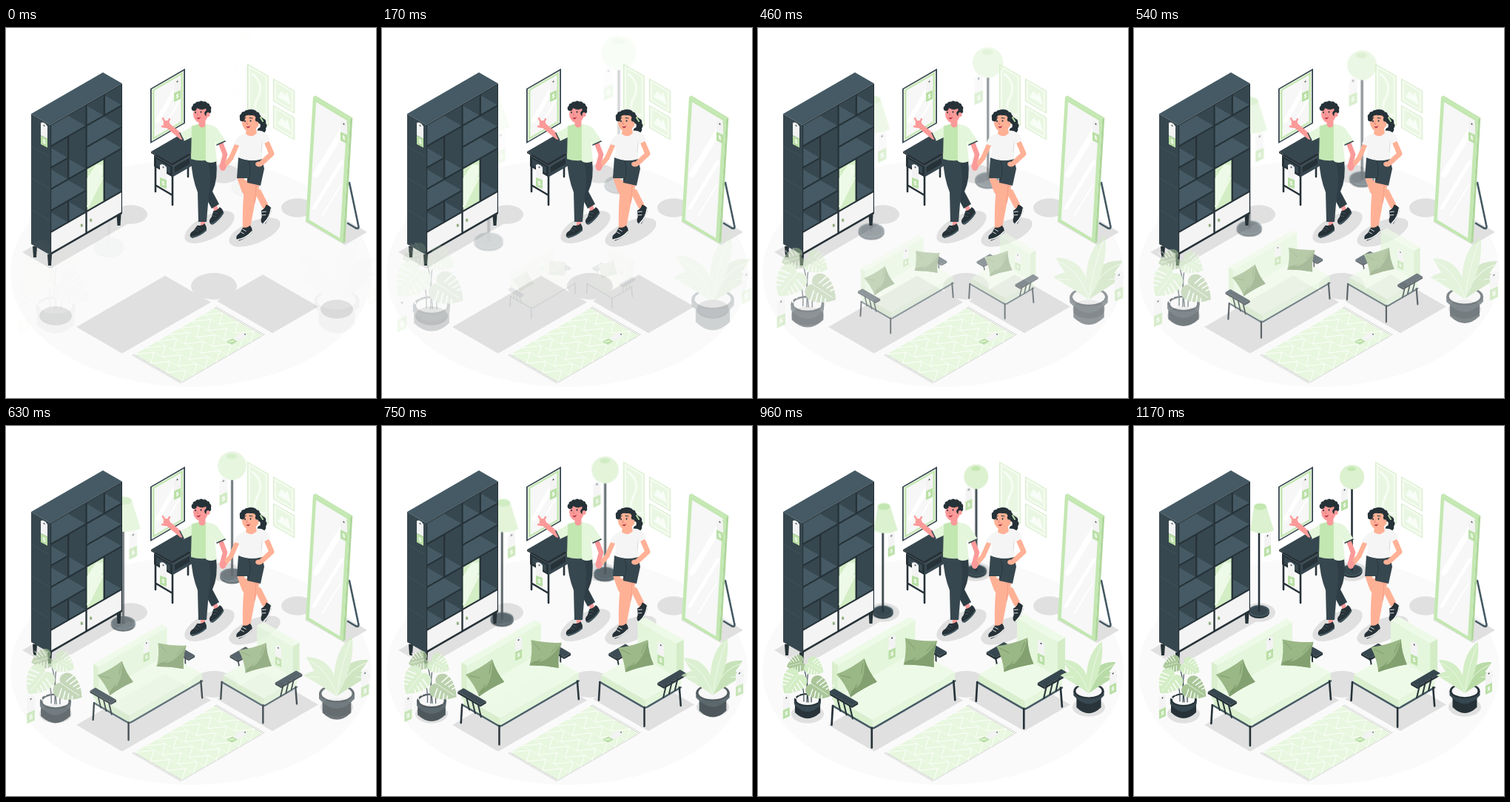
An HTML page that plays this animation: 500 px wide and 500 px high, repeating every 1210 ms.

```html
<!DOCTYPE html>
<html lang="en">
<head>
<meta charset="utf-8">
<title>Furniture showroom</title>
<style>
html, body { margin: 0; height: 100%; overflow: hidden; background: #fff }
svg { display: block; width: 100%; height: 100% }
text { font: 700 7px Inter, sans-serif; fill: #fff; text-anchor: middle }
</style>
</head>
<body>
<svg id="stage" viewBox="0 0 500 500"></svg>
<script>
const INK = '#263238', DARK = '#37474f', SLATE = '#455a64', SHADOW = '#e0e0e0';
const GREEN = '#c3e7b1', PALE = '#e4f6db', MINT = '#eefae8', LEAF = '#d3edc5', SAGE = '#a9c698';
const PINK = '#fb9a99', PEACH = '#ffb196', CLOTH = '#f5f5f5';
const ISO = Math.tan(Math.PI / 6);

const path = (d, fill) => `<path d="${d}" fill="${fill}"/>`;
const line = (d, color, width = 1) => `<path d="${d}" fill="none" stroke="${color}" stroke-width="${width}" ` +
  'stroke-linecap="round" stroke-linejoin="round"/>';
const oval = (x, y, rx, ry, fill, turn = 0) =>
  `<ellipse cx="${x}" cy="${y}" rx="${rx}" ry="${ry}" fill="${fill}" transform="rotate(${turn} ${x} ${y})"/>`;
const group = (transform, ...parts) => `<g transform="${transform}">${parts.join('')}</g>`;
const layer = (id, ...parts) => `<g id="${id}">${parts.join('')}</g>`;
const repeat = (n, make) => Array.from({ length: n }, (_, i) => make(i)).join('');

// Isometric shapes: dir 1 slopes down to the right, -1 slopes up
const wall = (x, y, w, h, dir, fill) => path(`M${x} ${y}l${w} ${dir * ISO * w}v${h}l${-w} ${-dir * ISO * w}Z`, fill);
const panel = (x, y, w, h, dir, inset, fill) =>
  wall(x + inset, y + inset * (1 + dir * ISO), w - 2 * inset, h - 2 * inset, dir, fill);
const ground = (x, y, p, q, fill) =>
  path(`M${x} ${y}l${p} ${p * ISO}l${q} ${-q * ISO}l${-p} ${-p * ISO}Z`, fill);
const box = (x, y, p, q, h, [top, left, right]) => ground(x, y, p, q, top) +
  wall(x, y, p, h, 1, left) + wall(x + p, y + p * ISO, q, h, -1, right);

const tag = (x, y, turn = -25, h = 30) => group(`translate(${x} ${y}) skewY(${turn})`,
  path(`M0 2L3 0H6L9 2V${h - 12}H0Z`, '#f3f3f3'), path(`M0 ${h - 12}H9V${h}H0Z`, '#b9dfa5'),
  oval(4.5, 3.5, 1, 1, DARK), `<text x="4.5" y="${h - 3.5}">$</text>`);

function shadows() {
  const spot = (x, y, rx = 22) => oval(x, y, rx, rx * ISO, SHADOW);
  return spot(281, 349, 31) + spot(394, 243) + spot(169, 252) + spot(294, 197) + spot(67, 389) + spot(447, 380) +
    ground(95, 404, 62, 120, SHADOW) + ground(285, 369, 75, 62, SHADOW) +
    ground(22, 303, 38, 110, SHADOW) + ground(404, 262, 54, 30, SHADOW) +
    oval(275, 269, 37, 16, SHADOW, -27) + oval(336, 276, 37, 15, SHADOW, -22);
}

function shelf() {
  // Each letter is one compartment
  const plan = ['AABC', 'DEFF', 'GEHH', 'IIJK', 'LMJK', 'NNOO'], unit = 97 / 4, row = 29;
  const compartment = name => {
    const rows = plan.filter(r => r.includes(name)), first = rows[0].indexOf(name);
    const x = 60 + first * unit + 1.2, y = 132.5 + plan.indexOf(rows[0]) * row - (x - 60) * ISO;
    const w = (rows[0].lastIndexOf(name) - first + 1) * unit - 2.4, h = rows.length * row - 2.5;
    if ('NO'.includes(name)) return wall(x, y, w, h, -1, '#f4f4f4') +
      oval(name === 'N' ? x + w - 5 : x + 5, y - (name === 'N' ? 10 : -11), 1.6, 2.3, '#8fae7e');
    if (name === 'J') return wall(x, y, w, h, -1, LEAF) +
      path(`M${x} ${y + 12}l12 -18h9v12l-21 44Z`, MINT) + line(`M${x + 1} ${y + 50}l19 -38`, MINT, 3);
    const depth = Math.min(w, h / 2 / ISO, 26), rise = depth * ISO;
    const right = x + w, floor = y + h - w * ISO;
    return wall(x, y, w, h, -1, '#33424a') +
      path(`M${x} ${y + h}L${right} ${floor}l${-depth} ${-rise}L${x} ${y + h - 2 * rise}Z`, SLATE) +
      path(`M${right} ${floor}v${-h}l${-depth} ${rise}V${floor - rise}Z`, DARK);
  };
  const leg = (x, y) => path(`M${x - 3} ${y}h6l-1 15h-4Z`, INK);
  return leg(39, 295) + leg(59, 306) + leg(152.5, 252) + box(34, 116, 26, 97, 176, [SLATE, DARK, INK]) +
    repeat(3, i => line(`M34.5 ${160 + i * 43}l25 14.400`, SLATE, .6)) +
    [...new Set(plan.join(''))].map(compartment).join('') + tag(47, 126, 28, 31);
}

function desk() {
  return line('M202 178V221M225 190V239M246 176V201M203 213l22 13', INK, 2.6) +
    box(200, 172, 25, 26, 15, [INK, INK, DARK]) + panel(200, 172, 25, 15, 1, 3, DARK) +
    panel(225, 186, 26, 14, -1, 3, INK) + box(196, 167, 28, 47, 2, [DARK, INK, INK]) + tag(208, 183, 20, 31);
}

function wallArt() {
  const frame = (x, y, h) => [[0, LEAF], [1.500, '#f4fbf0'], [4, PALE]]
    .map(([inset, fill]) => panel(x, y, 29, h, 1, inset, fill)).join('');
  const hills = y => path(`M367 ${y}l6 -8l4 6l3 -4l5 17Z`, '#f9fdf7');
  return `<g opacity=".8">${frame(326, 48, 68)}${frame(361, 68, 31)}${frame(361, 104, 31)}</g>` +
    line('M333 62Q350 75 340 95T349 118', '#f6fcf3', 3) + hills(93) + hills(129);
}

function mirrors() {
  const glass = (x, y, w, h, dir, inset) => panel(x, y, w, h, dir, inset, '#f6f7f6');
  const streak = (x, y, w, h, size) => line(`M${x} ${y}l${w} ${h}`, '#fff', size);
  return panel(195, 82, 47, 74, -1, 0, DARK) + panel(195, 82, 47, 74, -1, 1.800, '#f3f8f0') +
    panel(195, 82, 47, 74, -1, 3, GREEN) + glass(195, 82, 47, 74, -1, 5.5) +
    streak(205, 125, 23, -40, 6) + streak(217, 128, 18, -31, 2) + tag(227, 71, -25, 29) +
    line('M464 209L476 266Q478 273 472 270L462 264', SLATE, 2.6) +
    group('translate(415 93) skewX(-3.4)',
      ground(0, 0, 52, 3, GREEN), wall(52, 30, 3, 168, -1, '#aed69b'),
      panel(0, 0, 52, 168, 1, 0, GREEN), glass(0, 0, 52, 168, 1, 4.500),
      streak(10, 105, 34, -62, 8), streak(10, 150, 34, -62, 5), streak(22, 160, 22, -40, 2)) +
    tag(452, 124, 27, 28);
}

function rug() {
  const width = 64, length = 108, bands = 7;
  const at = (u, v) => [174 + width * v + length * u, 441 + ISO * (width * v - length * u)].join(' ');
  const zigzag = i => line('M' + Array.from({ length: 7 }, (_, k) => at((i + k % 2) / bands, k / 6)).join('L'), '#fff', .9);
  const fringe = k => line(`M${at(0, k / 30)}l-3 1.700M${at(1, k / 30)}l3 -1.700`, '#c4c9c1', .9);
  return repeat(31, fringe) + ground(174, 442.5, width, length, SHADOW) + ground(174, 441, width, length, '#e8f7df') +
    repeat(bands, zigzag) + repeat(bands - 1, i => line(`M${at((i + 1) / bands, 0)}L${at((i + 1) / bands, 1)}`, '#f7fcf4', .9)) +
    ground(298, 424, 7, 8, '#b9dfa5') + ground(306, 419.500, 7, 14, '#f3f3f3') + line('M302 424l6 -1', '#fff', 1.2) + oval(323, 414, 1, .7, DARK);
}

// Curls of hair along an arc, angles in degrees clockwise from the right
const curls = (x, y, rx, ry, from, to, count, size) => repeat(count, i => {
  const a = (from + (to - from) * i / (count - 1)) * Math.PI / 180;
  return oval(x + rx * Math.cos(a), y + ry * Math.sin(a), size, size, INK);
});

const face = (x, y) => oval(x - 4, y, .9, 1.300, INK) + oval(x + 3.5, y - .5, .9, 1.300, INK) +
  line(`M${x - 6} ${y - 4}l3 -.5M${x + 2} ${y - 4.5}l4 .5`, INK) +
  line(`M${x - 1} ${y + 1}l-1 3h2`, '#e27676', .8) + path(`M${x - 3} ${y + 7}q3 1 6 -1q-1 4 -4 3Z`, '#b83a48');

const shoe = (x, y, turn, sole) => group(`translate(${x} ${y}) rotate(${turn})`,
  path('M-12 4Q-12 -1 -5 -2L2 -7Q8 -4 12 -6Q14 -1 11 4Q0 8 -10 7Z', INK),
  line('M-11 5Q0 8 11 3', sole, 1.800), line('M-3 -3l3 4M1 -5l3 4', sole, .8));

function man() {
  return line('M266 260V270M281 237l3 9', PINK, 6) + shoe(283, 254, -38, SLATE) + shoe(259, 274, -20, SLATE) +
    path('M264 178H284Q287 204 279 221L288 238L278 244L265 220Z', '#2f3e46') +
    path('M250 177H272Q279 198 274 225L271 262H260L259 222Q251 202 250 177Z', DARK) +
    line('M237 147L219 132', PINK, 7) + oval(217, 130, 4.5, 5, PINK) +
    line('M215 128l-3 -6M216 134l-5 -1M219 127l2 -4', PINK, 2.5) +
    line('M290 155l6 16l-4 16', PINK, 6.5) +
    path('M235 142Q243 139 253 131L257 145L240 153Z', PALE) +
    path('M251 133Q262 127 272 131L277 178Q262 181 250 177Z', GREEN) +
    path('M270 130Q283 131 287 138L297 153L285 158L282 153L285 180Q276 184 270 180Z', PALE) +
    line('M285 158l11 -5M235 142l5 10', DARK, 1.6) +
    line('M265 124v6', PINK, 9) + oval(263, 116, 10, 12, PINK) +
    curls(264, 110, 10, 8, 190, 400, 9, 3.500) + oval(265, 105, 9, 5, INK) +
    oval(273, 117, 2.500, 3, PINK) + face(260, 114);
}

function woman() {
  return line('M317 203l6 17l18 2l9 18', PEACH, 9) + shoe(350, 252, -58, CLOTH) +
    path('M323 206H344Q340 222 336 238L330 270H320Q319 240 323 206Z', PEACH) + line('M338 212l-2 24', '#f39880', .8) +
    shoe(321, 277, -24, CLOTH) +
    line('M312 158l-8 18l-11 13', PEACH, 6.5) + oval(293, 187, 4.5, 6, PINK) +
    path('M314 175Q330 182 346 177L349 190L344 213L326 209V203H312Z', DARK) + line('M328 180q5 14 -1 26', INK, .8) +
    line('M353 156l6 14l-13 12', PEACH, 7) + oval(342, 184, 5, 3.500, PEACH) +
    curls(344, 132, 4, 7, -90, 90, 5, 4.500) +
    path('M317 145Q331 137 345 139Q354 142 357 152L347 157L346 177Q329 181 315 175L316 159L308 157Q311 148 317 145Z', CLOTH) +
    line('M346 155l-1 13', '#d9d9d9', .8) + path('M325 137L337 134L339 142Q331 150 324 143Z', PEACH) +
    oval(330, 127, 11, 13, PEACH) + curls(330, 121, 11, 7, 165, 380, 9, 3.500) + oval(331, 114, 8, 4, INK) +
    oval(339, 130, 2.500, 3.500, PEACH) + line('M344 121l3 5', '#b9dfa5', 2) + face(327, 126);
}

function lamps() {
  const stand = (x, top, base) => oval(x, base + 2, 14, 8, INK) + oval(x, base, 14, 8, SLATE) +
    oval(x, base, 12, 6.5, DARK) + line(`M${x} ${top}V${base}`, INK, 2.6);
  return stand(169, 140, 250) + path('M162 109L157 141Q172 149 189 141L179 109Z', '#dbf1cf') +
    oval(170.5, 109, 8.5, 4.5, GREEN) + tag(176, 147) +
    stand(294.5, 84, 195) + oval(294.5, 69, 16.5, 16.5, '#dbf1cf') + oval(294, 58, 6, 3, GREEN) + tag(280, 85);
}

const pot = (x, y, r, h, foot) =>
  path(`M${x - foot} ${y}V${y + h - 8}Q${x} ${y + h + 8} ${x + foot} ${y + h - 8}V${y}Z`, INK) +
  path(`M${x - r} ${y}v6Q${x} ${y + r + 8} ${x + r} ${y + 6}v-6Z`, DARK) +
  oval(x, y, r, r / 2, INK) + oval(x, y, r - 3, r / 2 - 2, '#f7f7f7');

function monstera() {
  const leaf = (x, y, turn, size, fill) => group(`translate(${x} ${y}) rotate(${turn}) scale(${size})`,
    path('M0 3C-5 -5 -19 0 -15 14Q-11 25 0 33Q11 25 15 14C19 0 5 -5 0 3Z', fill),
    repeat(4, i => line(`M-5 ${8 + i * 5}l-11 ${3 + i}M5 ${8 + i * 5}l11 ${3 + i}`, '#fbfcfa', 1.4)),
    line('M0 3V29', '#f3faef', .7));
  return pot(67, 370, 18, 25, 17) + line('M66 373Q68 340 60 322M68 373Q64 335 71 325M62 372Q63 350 54 337M72 373V350l6 -1', DARK, 1.2) +
    leaf(62, 319, 75, .72, SAGE) + leaf(66, 320, -60, .78, LEAF) + leaf(57, 334, 38, 1.05, LEAF) + leaf(70, 347, -56, 1, SAGE) +
    tag(34, 366);
}

function banana() {
  const frond = (turn, i) => {
    const len = 80 - .6 * Math.abs(turn), bow = -Math.sign(turn) * Math.abs(turn) / 5;
    const edge = side => `C${bow + side * 11} ${-len * .35} ${bow + side * 11} ${-len * .75}`;
    return group(`translate(447 361) rotate(${turn})`,
      path(`M0 0${edge(-1)} 0 ${-len}C${bow + 11} ${-len * .75} ${bow + 11} ${-len * .35} 0 0Z`, i % 2 ? '#b9dba6' : LEAF),
      line(`M0 0Q${bow * 1.5} ${-len / 2} 0 ${-len + 5}`, MINT, .8));
  };
  return pot(447, 358, 20.5, 30, 16.5) + [-58, 58, -38, 41, 14].map(frond).join('') + tag(475, 333);
}

const pillow = (x, y, turn) => group(`translate(${x} ${y}) rotate(${turn})`,
  path('M-21 -18Q0 -15 21 -18Q17 0 20 17Q0 15 -20 17Q-17 0 -21 -18Z', '#9ab786'),
  path('M-20 17Q-18 9 -4 10Q11 3 21 -18Q17 0 20 17Q0 15 -20 17Z', '#83a070'),
  line('M-17 -14l10 9M16 -13l-8 10M-14 13l9 -6', '#789765', .8));

function seat(x, y, p, q) {
  const front = y + p * ISO, side = front - q * ISO;
  return box(x, y, p, q, 11, [MINT, '#d9efcd', PALE]) +
    line(`M${x - 2} ${y + 10}L${x + p - 4} ${front + 9}q4 3 8 0L${x + p + q} ${side + 11}`, SLATE, 2.5) +
    line(`M${x - 2} ${y + 10}l-1.500 25M${x + p - 1} ${front + 10}v26M${x + p + q - 2} ${side + 11}l2 25`, INK, 2.6);
}

const arm = (x, y, p, q) => box(x, y, p, q, 3, [DARK, INK, INK]);
const posts = (x, y, dir) => line(repeat(3, i => `M${x + i * 8} ${y + i * 5 * dir}l${dir * 4} 17`), INK, 2);

function sofas() {
  return line('M241 306v16', INK, 2) + arm(226, 300, 20, 9) +
    box(105, 319, 8, 101, 50, [MINT, '#d9efcd', PALE]) + seat(108, 367, 50, 108) +
    posts(112, 367, 1) + arm(100, 359, 31, 8) +
    pillow(138, 341, -30) + pillow(220, 308, 5) + tag(179, 287) +
    line('M318 309l3 15', INK, 2) + arm(307, 307, 12, 23) +
    ground(347, 263, 53, 10, MINT) + wall(347, 263, 53, 52, 1, PALE) + wall(400, 293.600, 10, 46, -1, '#d3ecc6') +
    seat(297, 336, 60, 49) + posts(386, 350, -1) + arm(374, 347, 9, 31) +
    pillow(345, 311, -15) + tag(374, 290, 25);
}

const stage = document.getElementById('stage');
stage.innerHTML = oval(250, 331, 244, 154, '#fafafa') + shadows() + wallArt() + mirrors() + rug() +
  layer('lamps', lamps()) + shelf() + desk() + man() + woman() +
  layer('sofas', sofas()) + layer('monstera', monstera()) + layer('banana', banana());

// Timing curve cubic-bezier(.36, -.01, .5, 1.38)
function overshoot(x) {
  const curve = (a, b, u) => 3 * a * u * (1 - u) ** 2 + 3 * b * u * u * (1 - u) + u ** 3;
  let low = 0, high = 1;
  for (let i = 0; i < 24; i++) {
    const mid = (low + high) / 2;
    if (curve(.36, .5, mid) < x) low = mid; else high = mid;
  }
  return curve(-.01, 1.38, low);
}

function zoom(id, cx, cy, scale, opacity) {
  const el = document.getElementById(id);
  el.setAttribute('transform', `translate(${cx} ${cy}) scale(${scale}) translate(${-cx} ${-cy})`);
  el.setAttribute('opacity', Math.max(0, Math.min(1, opacity)));
}

const LOOP = 1210, STEP = 1000 / 24, LEAD = 30;

function draw(now) {
  const time = Math.floor((now % LOOP + 3) / STEP) * STEP + LEAD;
  const settle = Math.min(1, time / 1000), grow = overshoot(Math.min(1, time / 1200));
  zoom('lamps', 231, 157, 1.5 - settle / 2, settle);
  zoom('monstera', 67, 358, 1.5 - settle / 2, settle);
  zoom('banana', 447, 337, 1.5 - settle / 2, settle);
  zoom('sofas', 256, 345, .5 + grow / 2, grow);
  requestAnimationFrame(draw);
}
draw(0);
</script>
</body>
</html>
```
